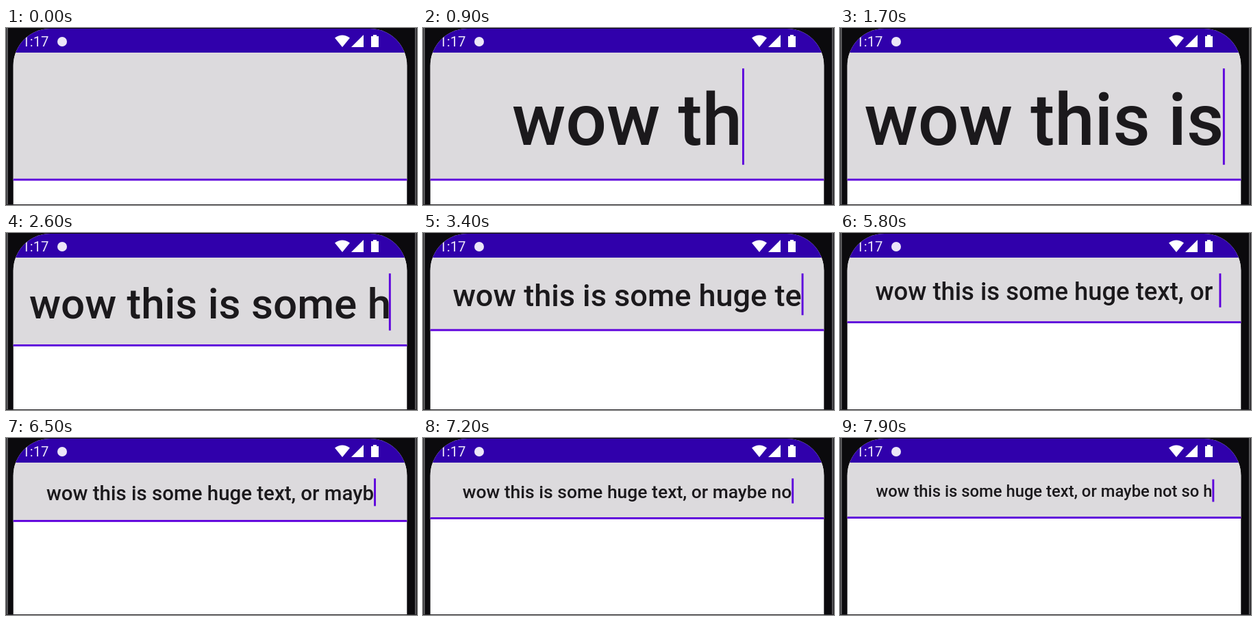
An HTML page for the animation above (8 s loop, 600 by 259 pixels).

```html
<!DOCTYPE html>
<html lang="en">
<head>
<meta charset="utf-8">
<title>Auto-sizing text field</title>
<style>
html, body { margin: 0; width: 100%; height: 100%; overflow: hidden; background: #0b0a0d; }
svg { display: block; width: 600px; height: 259px; }
text { font-family: Roboto, sans-serif; }
</style>
</head>
<body>
<svg viewBox="0 0 600 259">
  <defs>
    <clipPath id="screen"><rect x="10.7" y="1" width="574.6" height="400" rx="54"/></clipPath>
  </defs>
  <rect width="600" height="259" fill="#0b0a0d"/>
  <g fill="#2e2d30">
    <rect width="1" height="259"/>
    <rect x="598.5" width="1.5" height="259"/>
  </g>
  <g fill="#69686b">
    <rect x="1" width="1.7" height="259"/>
    <rect x="597" width="1.5" height="259"/>
  </g>
  <g clip-path="url(#screen)">
    <rect width="600" height="259" fill="#fff"/>
    <rect id="field" y="36" width="600" fill="#dcdadd"/>
    <rect id="line" width="600" height="2.9" fill="#5d00dc"/>
    <rect width="600" height="36" fill="#3000ab"/>
    <g fill="#fff">
      <text x="62.5" y="27.3" font-size="20.3" text-anchor="end" fill="#ece6f8">1:17</text>
      <circle cx="82" cy="20" r="7" fill="#ece6f8"/>
      <path d="M491 28 L480 14.4 Q491 6.4 502 14.4 Z"/>
      <path d="M504 28 H522 V10 Z"/>
      <path d="M536 10 H541 V12 H544 V28 H533 V12 H536 Z"/>
    </g>
    <text id="words" x="298" text-anchor="middle" font-weight="500" fill="#1b191c"></text>
    <rect id="cursor" width="2.9" fill="#5d00dc"/>
  </g>
  <rect y="258" width="600" height="1" fill="#2a292c"/>
</svg>
<script>
const LOOP = 8000, TICK = 100;
const PHRASE = "wow this is some huge text, or maybe not so h";
const BASE = 105.24, SHRINK = 0.8993, LEADING = 1.327, ASCENT = 1.056, SPACE = 0.249;
const MID = 298, CURSOR_MAX = 558.9;

// [time, characters typed]
const typing = [
  [0, 0], [100, 1], [1700, 11], [1900, 12], [2600, 18], [2800, 19], [3400, 24],
  [3800, 25], [4000, 26], [5300, 27], [5800, 31], [6000, 32], [6500, 35],
  [7500, 42], [7700, 43], [7900, 45], [8000, 45]
];
// lengths at which the text outgrows the field and drops one size
const shrinkAt = [13, 13, 14, 15, 16, 19, 20, 23, 25, 29, 32, 35, 39, 43];

const $ = id => document.getElementById(id);
const field = $("field"), line = $("line"), words = $("words"), cursor = $("cursor");

function set(el, attrs) {
  for (const key in attrs) el.setAttribute(key, attrs[key]);
}

function typedAt(t) {
  const i = typing.findIndex(key => key[0] > t);
  const [t0, n0] = typing[i - 1], [t1, n1] = typing[i];
  return Math.floor(n0 + (n1 - n0) * (t - t0) / (t1 - t0) + 1e-6);
}

function draw(ms) {
  const t = Math.floor(((ms + 10) % LOOP) / TICK) * TICK;
  const count = typedAt(t);
  const size = BASE * SHRINK ** shrinkAt.filter(n => n <= count).length;
  const height = size * LEADING;
  const natural = 82.3 + height;
  const bottom = Math.max(116.5, natural);
  const top = 59.6 + (bottom - natural) / 2;

  set(field, { height: bottom - 36 });
  set(line, { y: bottom - 1.45 });

  const typed = PHRASE.slice(0, count), shown = typed.trimEnd();
  words.textContent = shown;
  set(words, { y: top + size * ASCENT, "font-size": size });

  const width = shown ? words.getComputedTextLength() : 0;
  const end = MID + width / 2 + (typed.length - shown.length) * SPACE * size;
  const blinkOff = t < 100 || (t >= 4500 && t < 5000);
  set(cursor, {
    x: Math.min(end, CURSOR_MAX),
    y: top - 0.4,
    height: height + 1.3,
    visibility: blinkOff ? "hidden" : "visible"
  });
}

const start = performance.now();
function frame() {
  draw(performance.now() - start);
  requestAnimationFrame(frame);
}
frame();
</script>
</body>
</html>
```
